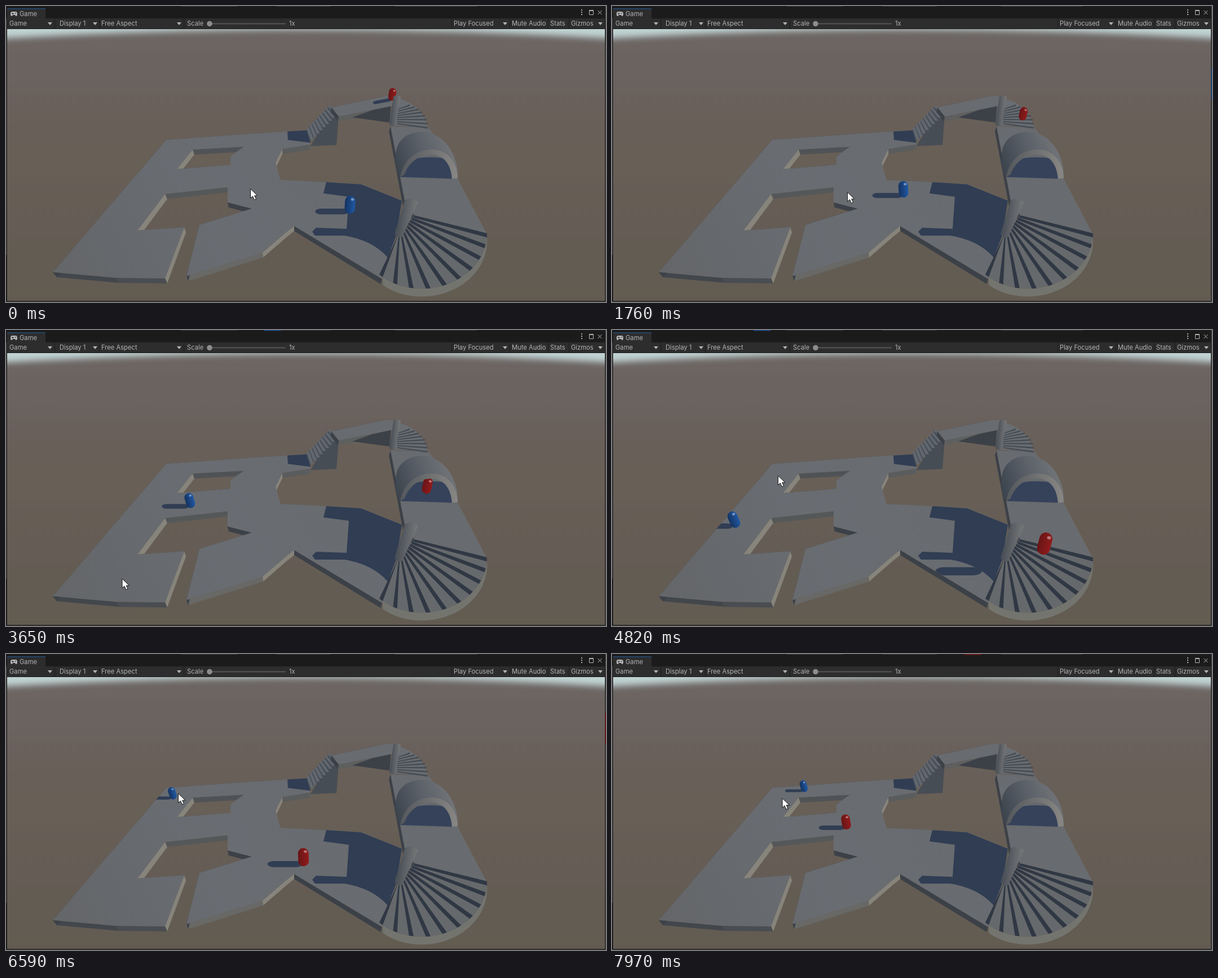
Recreate the animation shown at these times as an HTML page. Size 1064 by 526 pixels, loop 7.99 s.

```html
<!DOCTYPE html>
<html lang="en">
<head>
<meta charset="utf-8">
<title>Game view</title>
<style>
  html, body { margin: 0; width: 100%; height: 100%; overflow: hidden; background: #1b1b1b; }
  svg { display: block; width: 100vw; height: 100vh; }
  text { font: 11.2px Inter, Roboto, sans-serif; fill: #b4b4b4; }
  .slab { fill: url(#floor); fill-rule: evenodd; clip-rule: evenodd; }
  .shade { fill: #303d53; }
  .dark { fill: #3c4148; }
</style>
</head>
<body>
<svg viewBox="0 0 1064 526" preserveAspectRatio="none">
  <defs>
    <linearGradient id="ground" x1="0" y1="0" x2="0" y2="1">
      <stop offset="0" stop-color="#6d6664"/><stop offset=".35" stop-color="#685f58"/>
      <stop offset="1" stop-color="#625a50"/>
    </linearGradient>
    <linearGradient id="floor" gradientUnits="userSpaceOnUse" x1="100" y1="480" x2="600" y2="200">
      <stop offset="0" stop-color="#646669"/><stop offset=".5" stop-color="#696d72"/>
      <stop offset="1" stop-color="#686b6f"/>
    </linearGradient>
    <linearGradient id="tube" gradientUnits="userSpaceOnUse" x1="694" y1="285" x2="790" y2="248">
      <stop offset="0" stop-color="#3d454f"/><stop offset=".5" stop-color="#5a6068"/>
      <stop offset="1" stop-color="#727579"/>
    </linearGradient>
    <linearGradient id="ring">
      <stop offset="0" stop-color="#54585c"/><stop offset="1" stop-color="#888784"/>
    </linearGradient>
    <linearGradient id="post" x1="0" y1=".4" x2="1" y2=".6">
      <stop offset=".1" stop-color="#464c54"/><stop offset=".9" stop-color="#777879"/>
    </linearGradient>
    <linearGradient id="blue">
      <stop offset="0" stop-color="#14325f"/><stop offset="1" stop-color="#2159a5"/>
    </linearGradient>
    <linearGradient id="red">
      <stop offset="0" stop-color="#681516"/><stop offset="1" stop-color="#921b1c"/>
    </linearGradient>
    <filter id="soft" x="-5%" y="-5%" width="110%" height="110%"><feGaussianBlur stdDeviation="6"/></filter>
    <clipPath id="view"><path d="M2 41H1062V524H2z"/></clipPath>
    <clipPath id="walkable"><use href="#plaza"/><use href="#bridge"/><use href="#terrace"/></clipPath>
    <g id="capsule">
      <rect x="-.29" y="-.5" width=".58" height="1" rx=".29"/>
      <ellipse cx=".12" cy="-.3" rx=".09" ry=".07" fill="#fff" fill-opacity=".4"/>
    </g>
  </defs>

  <path fill="#1b1b1b" d="M0 0H1064V526H0z"/>
  <path fill="#555150" d="M0 22h1v420H0zM1063 0h1v526h-1z"/>
  <path fill="#404040" d="M310 0h100v1h-100zM480 0h96v1h-96zM690 0h145v1H690zM0 525H1064v1H0z"/>
  <path fill="#2d2d2d" d="M2 5H70V22H1062V40H2z"/>
  <path fill="#244c78" d="M2 4H70V5.500H2z"/>
  <g fill="#b4b4b4">
    <path d="M11 10h6q3 0 3 4t-2 4q-1 0-2-2h-4q-1 2-2 2-2 0-2-4t3-4z"/>
    <path id="arrow" d="M74 29h8l-4 5z"/>
    <use href="#arrow" x="80"/><use href="#arrow" x="229"/><use href="#arrow" x="807"/><use href="#arrow" x="976"/>
    <path d="M1020 6h2v2h-2zM1020 10h2v2h-2zM1020 14h2v2h-2z"/>
  </g>
  <path fill="#2d2d2d" d="M10 13h4v1h-4zM11.500 12h1v3h-1zM16 12h1.500v1.500H16z"/>
  <path fill="none" stroke="#b4b4b4" d="M1034.500 7.500h7v8h-7zM1034 8.500h8M1049.500 8l7 7M1056.500 8l-7 7"/>
  <path stroke="#1b1b1b" d="M86.500 22V40M165.500 22V40M315.500 22V40M790.500 22V40M893.500 22V40M961.500 22V40M998.500 22V40"/>
  <path stroke="#555" stroke-width="2" d="M361 31.500H496"/>
  <circle cx="361" cy="31.500" r="4.800" fill="#8d8d8d"/>
  <text x="24" y="18">Game</text><text x="6" y="35">Game</text><text x="95" y="35">Display 1</text>
  <text x="169" y="35">Free Aspect</text><text x="321" y="35">Scale</text><text x="502" y="35">1x</text>
  <text x="794" y="35">Play Focused</text><text x="897" y="35">Mute Audio</text>
  <text x="965" y="35">Stats</text><text x="1002" y="35">Gizmos</text>

  <g clip-path="url(#view)">
    <path fill="#c0d2d2" d="M2 41H1062V90H2z"/>
    <path fill="url(#ground)" filter="url(#soft)" d="M-40 60Q532 24 1104 60V560H-40z"/>

    <path id="plaza" class="slab" d="M284 238L462 225 533 221 540 246 490 254 478 278 486 309 568 313 630 317 702 346 692 408 667 485 511 391 497 402 455 438 320 480 343 389 436 360 393 349 393 322 282 334 233 399 316 393 282 484 195 483 83 473zM331 255L303 290 398 282 398 267 422 250z"/>
    <path class="shade" d="M499 223L533 221 540 243 500 238zM568 313L630 317 702 346 692 408 677 447Q650 416 600 408L548 408 543 401 550 394 604 396 608 339 563 333z"/>

    <path fill="#474d54" d="M540 249L586 247 590 196 577 185z"/>
    <g id="stairs"></g>
    <path id="bridge" class="slab" d="M577 180L672 160 690 160 683 178 590 196z"/>
    <path class="dark" d="M614 198L650 185 683 178 680 207z"/>

    <path id="terrace" class="slab" d="M682 214L748 215 758 228 800 306 851 403 724 372 707 345z"/>
    <path fill="#6a6e72" d="M690 163Q735 172 748 214L683 212z"/>
    <g id="farSteps"></g>

    <g clip-path="url(#walkable)" class="shade"><rect id="blueShade"/><rect id="redShade"/></g>
    <path fill="#666a6e" d="M704 300L730 262H774L794 306z"/>
    <path fill="#35425a" d="M699 304L718 273Q748 265 783 272L793 307z"/>

    <g id="redBehind"></g>
    <path fill="url(#post)" d="M687 161Q693 156 700 161L690 213Q684 215 680 210z"/>
    <path fill="url(#tube)" d="M699 304Q686 285 693 252C702 228 725 221 748 225C780 231 803 268 801 306L791 307C789 280 776 264 753 264C733 264 715 277 707 300z"/>
    <path fill="url(#ring)" d="M699 304C705 270 731 255 754 255C782 255 800 276 801 306L791 307C789 280 776 264 753 264C733 264 713 278 707 299z"/>

    <g id="nearSteps"></g>
    <path fill="url(#post)" d="M707 346Q715 338 731 348L703 410Q694 414 689 405z"/>

    <g id="blueBody" fill="url(#blue)"><use href="#capsule"/></g>
    <g id="redAhead"><g id="redBody" fill="url(#red)"><use href="#capsule"/></g></g>
  </g>

  <g id="peeks"></g>
  <path id="cursor" fill="#fff" stroke="#111" d="M0 0V16.500L4 13 7 19.500 10 18 7.200 12H12.500z"/>
</svg>
<script>
const LOOP = 7990;
const $ = id => document.getElementById(id);
const mix = (a, b, k) => a + (b - a) * k;
const clamp = v => Math.min(1, Math.max(0, v));
const linear = k => k;
const smooth = k => k * k * (3 - 2 * k);

// Waypoints: [time, x, y]
const blueRoute = [
  [850, 610, 353], [2580, 433, 301], [3650, 326, 303], [4820, 216, 337],
  [6590, 295, 247.5], [7200, 296, 247], [7970, 340, 235]
];
const redRoute = [
  [120, 685, 157], [970, 697, 163], [2000, 739, 200], [2580, 736, 228], [3650, 747, 276.5],
  [4820, 767.5, 379.5], [5400, 712, 441], [5740, 645, 418], [6590, 527.5, 361], [7970, 415, 298.5]
];
const cursorRoute = [
  [500, 433.5, 325], [1100, 431, 387], [1720, 418.5, 331], [2580, 276, 324],
  [3400, 202, 463], [3650, 206, 442], [4820, 294.5, 259], [6590, 305.5, 248], [7970, 302, 256.5]
];

function along(route, t, ease = linear) {
  const next = route.findIndex(p => p[0] > t);
  if (next === 0) return route[0].slice(1);
  if (next < 0) return route.at(-1).slice(1);
  const [a, b] = [route[next - 1], route[next]];
  const k = ease((t - a[0]) / (b[0] - a[0]));
  return [mix(a[1], b[1], k), mix(a[2], b[2], k)];
}

function add(parent, tag, attrs) {
  const el = document.createElementNS('http://www.w3.org/2000/svg', tag);
  set(el, attrs);
  parent.append(el);
  return el;
}

function set(el, attrs) {
  for (const name in attrs) el.setAttribute(name, attrs[name]);
}

const poly = (parent, fill, points) => add(parent, 'polygon', { fill, points: points.join(' ') });

// Light comes from the right, so a wall is as bright as it faces that way.
function wallColor(facing) {
  const k = clamp(.2 + facing * 1.3);
  return `rgb(${mix(60, 135, k)},${mix(65, 132, k)},${mix(72, 123, k)})`;
}

function addWalls(slab) {
  const walls = add(slab.parentNode, 'g', {});
  slab.before(walls);
  const below = ([x, y]) => [x + (511 - x) * .017, y + 9];
  for (const ring of slab.getAttribute('d').split('z')) {
    const n = (ring.match(/[\d.]+/g) || []).map(Number);
    const corners = n.filter((_, i) => i % 2 === 0).map((x, i) => [x, n[2 * i + 1]]);
    corners.forEach((a, i) => {
      const b = corners[(i + 1) % corners.length];
      const facing = (b[1] - a[1]) / Math.hypot(b[0] - a[0], b[1] - a[1]);
      poly(walls, wallColor(facing), [a, b, below(b), below(a)]);
    });
  }
}

function buildStairs(count) {
  const left = k => [mix(533, 575, k), mix(221, 178, k)];
  const right = k => [mix(540, 590, k), mix(243, 193, k)];
  for (let i = 0; i < count; i++) {
    const [a, b, c, d] = [left(i / count), right(i / count), right((i + 1) / count), left((i + 1) / count)];
    poly($('stairs'), '#48505b', [a, b, [b[0], c[1]], [a[0], d[1]]]);
    poly($('stairs'), '#626870', [[a[0], d[1]], [b[0], c[1]], c, d]);
  }
}

function buildFarSteps(count) {
  for (let i = 0; i < count; i++) {
    const k = i / (count - 1), angle = mix(-1.2, .1, k);
    const x = 698 + 50 * Math.cos(angle), y = 212 + 39 * Math.sin(angle), hub = mix(183, 208, k);
    poly($('farSteps'), '#474d55', [[694, hub], [x, y - 1], [x, y + 2], [693, hub + 2]]);
  }
}

function buildNearSteps(count) {
  const group = $('nearSteps');
  const turn = k => 2.3 * k ** 1.1;
  const rim = (angle, drop = 0) => [742 + 111 * Math.cos(angle), 404 + 92 * Math.sin(angle) + 4 * angle + drop];
  const arc = drop => Array.from({ length: 31 }, (_, i) => rim(2.3 * i / 30, drop));
  poly(group, '#74746f', [...arc(0), ...arc(14).reverse()]);
  poly(group, '#66696c', [[724, 372], ...arc(0), [695, 408]]);
  for (let i = 0; i < count; i++) {
    const k = i / (count - 1), angle = turn(k);
    const hub = [mix(724, 695, k), mix(372, 408, k)];
    poly(group, '#303844', [hub, rim(angle), rim(angle + .075), [hub[0] - 2, hub[1] + 4]]);
  }
}

function sizeOf([x, y]) {
  const raised = clamp((x - 640) / 110);
  return Math.max(21, .09 * y) * (1 + .17 * raised);
}

function placeBody(el, [x, y], size) {
  set(el, { transform: `translate(${x} ${y}) rotate(${(x - 560) * .07}) scale(${size})` });
}

// lift moves the shadow down to the lower floor
function placeShadow(el, [x, y], size, lift = 0, tilt = 0) {
  const length = 2.7 * size - 26, thick = .5 * size - 5.5;
  set(el, {
    x: x - length - 2 - 110 * lift, y: y + .38 * size - thick / 2 + 34 * lift,
    width: length, height: thick, rx: thick, ry: thick / 2, transform: `rotate(${tilt} ${x} ${y})`
  });
}

// Slivers of the window behind that show past the border
function makePeek(fill) {
  const top = add($('peeks'), 'rect', { fill, width: 30, height: 1.5 });
  const side = add($('peeks'), 'rect', { fill, x: 1062.5, width: 1.5, height: 54 });
  return ([x, y]) => {
    set(top, { x: 1.88 * x - 155, opacity: +(x < 450 && y > 270) });
    set(side, { y: 105 - .6 * (x - 527), opacity: +(x > 505 && x < 550) });
  };
}

document.querySelectorAll('.slab').forEach(addWalls);
buildStairs(9);
buildFarSteps(8);
buildNearSteps(10);
const peekBlue = makePeek('#1c4c8c'), peekRed = makePeek('#7a1719');

function draw(t) {
  const blue = along(blueRoute, t), red = along(redRoute, t);
  const blueSize = sizeOf(blue.map((v, i) => i ? v : Math.min(v, 640))), redSize = sizeOf(red);
  placeBody($('blueBody'), blue, blueSize);
  placeShadow($('blueShade'), blue, blueSize);

  const body = $('redBody'), layer = $(t < 3800 ? 'redBehind' : 'redAhead');
  if (body.parentNode !== layer) layer.append(body);
  placeBody(body, red, redSize);
  placeShadow($('redShade'), red, redSize, t > 4400 ? clamp((5600 - t) / 780) : 0, red[1] < 170 ? -11 : 0);

  set($('cursor'), { transform: `translate(${along(cursorRoute, t, smooth)})` });
  peekBlue(blue);
  peekRed(red);
}

const start = performance.now();
function tick() {
  draw((performance.now() - start) % LOOP);
  requestAnimationFrame(tick);
}
tick();
</script>
</body>
</html>
```
